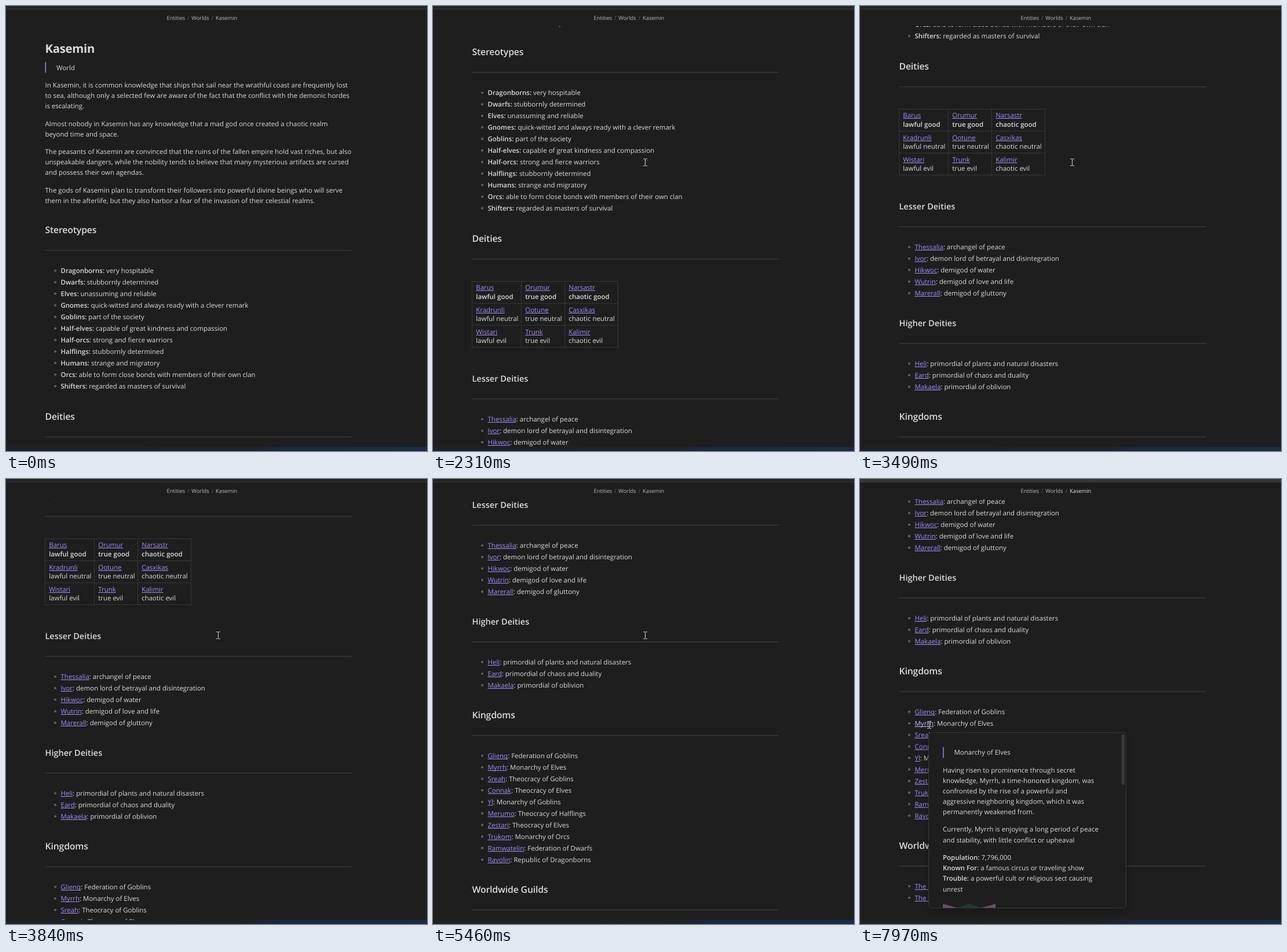
An HTML page with a canvas for the animation above (8 s loop, 727x770 px).

```html
<!DOCTYPE html>
<html lang="en">
<head>
<meta charset="utf-8">
<title>Kasemin</title>
<style>
html, body { margin: 0; width: 100%; height: 100%; overflow: hidden; background: #1e1e1e; }
canvas { display: block; }
</style>
</head>
<body>
<canvas id="stage" width="727" height="770"></canvas>
<script>
const ctx = document.getElementById('stage').getContext('2d');
const LOOP = 8000, TICK = 75.7, LINE = 18.17, ITEM = 19.98, LEFT = 67.5;
const FAMILY = '"Open Sans", "Noto Sans", sans-serif';
const TEXT = '#dadada', LINK = '#a58af8', HOVER = '#c5b6fb', RULE = '#363636', BACK = '#1e1e1e';
const BODY = { weight: 400, size: 11.48 };
const STRONG = { weight: 600, size: 11.48 };
const CRUMB = { weight: 400, size: 9.3 };
const H1 = { weight: 700, size: 20.4, spacing: -0.3, drop: 7.6 };
const H2 = { weight: 600, size: 15.8, spacing: -0.16, drop: 5.7 };
const H3 = { weight: 600, size: 14.5, drop: 5.3 };

const intro = [
  ['In Kasemin, it is common knowledge that ships that sail near the wrathful coast are frequently lost',
   'to sea, although only a selected few are aware of the fact that the conflict with the demonic hordes',
   'is escalating.'],
  ['Almost nobody in Kasemin has any knowledge that a mad god once created a chaotic realm',
   'beyond time and space.'],
  ['The peasants of Kasemin are convinced that the ruins of the fallen empire hold vast riches, but also',
   'unspeakable dangers, while the nobility tends to believe that many mysterious artifacts are cursed',
   'and possess their own agendas.'],
  ['The gods of Kasemin plan to transform their followers into powerful divine beings who will serve',
   'them in the afterlife, but they also harbor a fear of the invasion of their celestial realms.']
];

const sections = [
  { title: 'Stereotypes', style: H2, y: 387.4, strong: true, items: [
    'Dragonborns: very hospitable', 'Dwarfs: stubbornly determined', 'Elves: unassuming and reliable',
    'Gnomes: quick-witted and always ready with a clever remark', 'Goblins: part of the society',
    'Half-elves: capable of great kindness and compassion', 'Half-orcs: strong and fierce warriors',
    'Halflings: stubbornly determined', 'Humans: strange and migratory',
    'Orcs: able to form close bonds with members of their own clan',
    'Shifters: regarded as masters of survival'] },
  { title: 'Deities', style: H2, y: 710.3, items: [] },
  { title: 'Lesser Deities', style: H3, y: 952.4, items: [
    'Thessalia: archangel of peace', 'Ivor: demon lord of betrayal and disintegration',
    'Hikwoc: demigod of water', 'Wutrin: demigod of love and life', 'Marerall: demigod of gluttony'] },
  { title: 'Higher Deities', style: H3, y: 1154.2, items: [
    'Heli: primordial of plants and natural disasters', 'Eard: primordial of chaos and duality',
    'Makaela: primordial of oblivion'] },
  { title: 'Kingdoms', style: H2, y: 1316.2, items: [
    'Glienq: Federation of Goblins', 'Myrrh: Monarchy of Elves', 'Sreah: Theocracy of Goblins',
    'Connak: Theocracy of Elves', 'Yl: Monarchy of Goblins', 'Merumo: Theocracy of Halflings',
    'Zestari: Theocracy of Elves', 'Trukom: Monarchy of Orcs', 'Ramwatelin: Federation of Dwarfs',
    'Ravolin: Republic of Dragonborns'] },
  { title: 'Worldwide Guilds', style: H2, y: 1618, items: [
    'The Lanterns: guild of merchants', 'The Wardens: guild of hunters'] }
];

const table = {
  top: 783.8, row: 38.1, edges: [67.5, 152.5, 227.5, 319.5],
  rows: [
    ['Barus', 'Orumur', 'Narsastr', 'good'],
    ['Kradrunli', 'Ootune', 'Casxikas', 'neutral'],
    ['Wistari', 'Trunk', 'Kalimir', 'evil']
  ]
};

// Each move: start, end, number of steps, from, to.
const scrolls = [
  [1460, 1590, 3, 0, 1], [1660, 1980, 6, 1, 4], [2310, 2520, 4, 4, 5], [2590, 2730, 3, 5, 6],
  [3140, 3490, 6, 6, 8], [3570, 3840, 5, 8, 9], [4370, 4580, 4, 9, 10], [4710, 4850, 3, 10, 11],
  [5320, 5460, 3, 11, 12], [6600, 6740, 3, 12, 13]
];
const moves = [
  [640, 990, 6, [760, 842], [366, 269.5]], [6810, 7100, 5, [366, 269.5], [59, 398]],
  [7170, 7360, 4, [59, 398], [114, 430]], [7970, 7970, 1, [114, 430], [119.5, 424.5]]
];

const easeInOut = p => p < 0.5 ? 4 * p ** 3 : 1 - 4 * (1 - p) ** 3;
const easeOut = p => 1 - (1 - p) ** 2;
const mix = (a, b, p) => a + (b - a) * p;

function progress(t, [start, end, steps]) {
  if (t < start) return 0;
  if (t >= end) return 1;
  const gap = (end - start) / (steps - 1);
  return (Math.floor((t - start) / gap + 1e-6) + 1) / steps;
}

function scrollAt(t) {
  return TICK * scrolls.reduce((sum, s) => sum + (s[4] - s[3]) * easeInOut(progress(t, s)), 0);
}

function cursorAt(t) {
  const move = moves.filter(m => t >= m[0]).pop();
  if (!move) return null;
  const p = easeOut(progress(t, move));
  return [0, 1].map(i => mix(move[3][i], move[4][i], p));
}

function rect(x, y, w, h, color) {
  ctx.fillStyle = color;
  ctx.fillRect(x, y, w, h);
}

// Draws text centred on y and returns its right edge.
function write(text, x, y, style = BODY, color = TEXT) {
  ctx.font = `${style.weight} ${style.size}px ${FAMILY}`;
  ctx.letterSpacing = `${style.spacing || 0}px`;
  ctx.fillStyle = color;
  ctx.fillText(text, x, Math.round(y + (style.drop || 4.2)));
  return x + ctx.measureText(text).width;
}

function link(text, x, y, color = LINK) {
  const end = write(text, x, y, BODY, color);
  rect(x, Math.round(y + 4.2) + 1, end - x, 1, color);
  return end;
}

function labelled(text, x, y) {
  const cut = text.indexOf(':') + 1;
  write(text.slice(cut), write(text.slice(0, cut), x, y, STRONG), y);
}

function paragraphs(groups, x, y) {
  for (const lines of groups) {
    lines.forEach((line, i) => write(line, x, y + i * LINE));
    y += lines.length * LINE + 12.1;
  }
}

function quote(text, x, y) {
  rect(x, Math.round(y - 9.3), 1.6, 18.5, '#8b87d6');
  write(text, x + 19.5, y);
}

function drawSection({ title, style, y, strong, items }, hovered) {
  write(title, LEFT, y, style);
  rect(LEFT, Math.round(y + 34.8), 529.5, 1.5, RULE);
  items.forEach((item, i) => {
    const itemY = y + 70.6 + i * ITEM;
    ctx.fillStyle = '#5f5f5f';
    ctx.beginPath();
    ctx.arc(85, itemY, 2.1, 0, 7);
    ctx.fill();
    if (strong) return labelled(item, 94.5, itemY);
    const cut = item.indexOf(':'), name = item.slice(0, cut);
    write(item.slice(cut), link(name, 94.5, itemY, name === hovered ? HOVER : LINK), itemY);
  });
}

function drawTable() {
  const { top, row, edges, rows } = table;
  const height = row * rows.length;
  edges.forEach(x => rect(x - 0.5, top, 1, height, RULE));
  for (let i = 0; i <= rows.length; i++) rect(67, Math.round(top + i * row), 253, 1, RULE);
  rows.forEach((cells, r) => ['lawful', 'true', 'chaotic'].forEach((order, c) => {
    const x = edges[c] + 6.7, y = top + r * row + 11.4;
    link(cells[c], x, y);
    write(`${order} ${cells[3]}`, x, y + 15.7, r ? BODY : STRONG);
  }));
}

function drawPage(scroll, hovered) {
  ctx.save();
  ctx.beginPath();
  ctx.rect(0, 35, 727, 728);
  ctx.clip();
  ctx.translate(0, -Math.round(scroll));
  write('Kasemin', LEFT, 73.2, H1);
  quote('World', LEFT, 106.3);
  paragraphs(intro, LEFT, 136.8);
  sections.forEach(s => drawSection(s, hovered));
  drawTable();
  ctx.restore();
}

function polygon(points, color) {
  ctx.fillStyle = color;
  ctx.beginPath();
  points.forEach(p => ctx.lineTo(...p));
  ctx.fill();
}

function drawPopup(alpha) {
  if (alpha <= 0) return;
  ctx.save();
  ctx.globalAlpha = alpha;
  ctx.beginPath();
  ctx.roundRect(118.5, 438.5, 341, 304, 5);
  ctx.save();
  ctx.shadowColor = 'rgba(0,0,0,0.3)';
  ctx.shadowBlur = 14;
  ctx.shadowOffsetY = 3;
  ctx.fillStyle = BACK;
  ctx.fill();
  ctx.restore();
  ctx.strokeStyle = RULE;
  ctx.stroke();
  quote('Monarchy of Elves', 143, 472.9);
  paragraphs([
    ['Having risen to prominence through secret', 'knowledge, Myrrh, a time-honored kingdom, was',
     'confronted by the rise of a powerful and', 'aggressive neighboring kingdom, which it was',
     'permanently weakened from.'],
    ['Currently, Myrrh is enjoying a long period of peace', 'and stability, with little conflict or upheaval']
  ], 143, 503.3);
  ['Population: 7,796,000', 'Known For: a famous circus or traveling show',
   'Trouble: a powerful cult or religious sect causing'
  ].forEach((line, i) => labelled(line, 143, 654.8 + i * LINE));
  write('unrest', 143, 709.3);
  polygon([[143, 735], [168, 742], [143, 742]], '#6a4c6b');
  polygon([[234, 735], [234, 742], [209, 742]], '#6a4c6b');
  polygon([[188.5, 735], [210, 742], [167, 742]], '#253735');
  ctx.fillStyle = '#393939';
  ctx.beginPath();
  ctx.roundRect(451.5, 442, 5.5, 87, 2);
  ctx.fill();
  ctx.restore();
}

function drawFrameBars(focused) {
  rect(0, 0, 727, 5, focused ? RULE : '#262626');
  rect(0, 5, 727, 1, RULE);
  write('Entities', 277.5, 19.5, CRUMB, '#bababa');
  write('/', 313, 19.5, CRUMB, '#666');
  write('Worlds', 320.3, 19.5, CRUMB, '#bababa');
  write('/', 354.7, 19.5, CRUMB, '#666');
  write('Kasemin', 362, 19.5, CRUMB, focused ? '#e4e4e4' : '#bababa');
  const glow = ctx.createLinearGradient(0, 0, 727, 0);
  glow.addColorStop(0, '#1e2127');
  glow.addColorStop(0.58, '#1e222a');
  glow.addColorStop(0.66, '#1b293e');
  glow.addColorStop(1, '#1b2b44');
  rect(0, 763, 727, 7, glow);
}

function drawCursor(pos) {
  if (!pos) return;
  const x = Math.round(pos[0] - 0.5), y = Math.round(pos[1] - 6);
  const color = '#d0d0d0';
  rect(x, y + 1, 1, 11, color);
  for (const edge of [y, y + 12]) {
    rect(x - 3, edge, 3, 1, color);
    rect(x + 1, edge, 3, 1, color);
  }
}

function draw(now) {
  const t = now % LOOP, focused = t >= 7430;
  ctx.textRendering = 'geometricPrecision';
  rect(0, 0, 727, 770, BACK);
  drawPage(scrollAt(t), focused ? 'Myrrh' : '');
  drawFrameBars(focused);
  drawPopup(progress(t, [7510, 7830, 5]));
  drawCursor(cursorAt(t));
  requestAnimationFrame(draw);
}

const origin = performance.now();
const begin = draw;
draw = now => begin(Math.max(0, now - origin));
requestAnimationFrame(t => draw(t));
</script>
</body>
</html>
```
